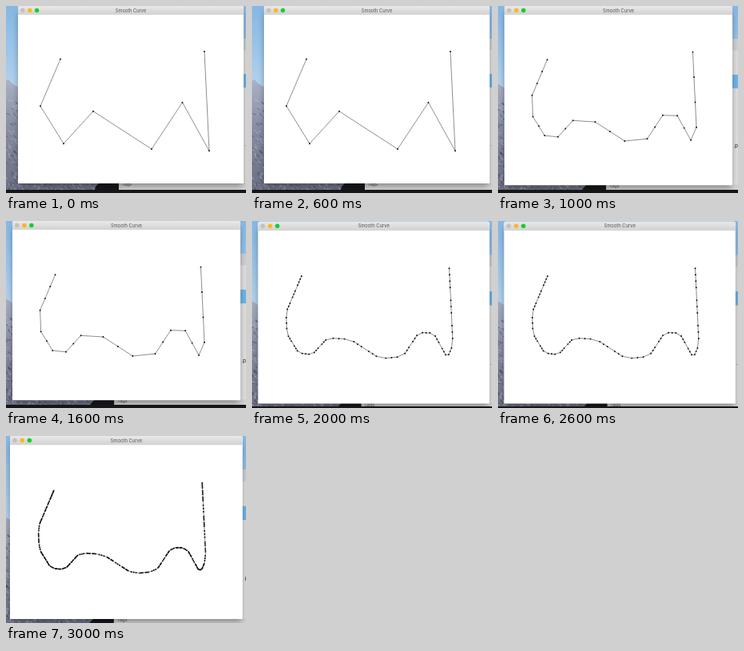
These frames come from a looping animation (300 px wide and 234 px high, 4 s). An HTML page:

```html
<!DOCTYPE html>
<html lang="en">
<head>
<meta charset="utf-8">
<title>Smooth Curve</title>
<style>
  html, body { margin: 0; width: 100%; height: 100%; overflow: hidden; background: #161616; }
  svg { display: block; width: 100%; height: 100%; }
  text { font-family: Inter, "Open Sans", sans-serif; }
</style>
</head>
<body>
<svg viewBox="0 0 300 234">
  <defs>
    <linearGradient id="sky" x1="0" y1="0" x2="0" y2="1">
      <stop offset="0" stop-color="#83b6e2"/>
      <stop offset=".5" stop-color="#9cc5ea"/>
      <stop offset="1" stop-color="#bcd6ee"/>
    </linearGradient>
    <linearGradient id="rock" x1="0" y1="0" x2="0" y2="1">
      <stop offset="0" stop-color="#a9b2c6"/>
      <stop offset=".4" stop-color="#878ca2"/>
      <stop offset="1" stop-color="#666a7e"/>
    </linearGradient>
    <linearGradient id="bar" x1="0" y1="0" x2="0" y2="1">
      <stop offset="0" stop-color="#e9e9e9"/>
      <stop offset="1" stop-color="#d2d2d2"/>
    </linearGradient>
    <filter id="blur" x="-10%" y="-10%" width="120%" height="120%">
      <feGaussianBlur stdDeviation="4"/>
    </filter>
  </defs>
  <g id="scene">
    <rect x="-5" y="-5" width="320" height="120" fill="url(#sky)"/>
    <path d="M-5 95L3 92L8 97L16 102V215H145V245H-5Z" fill="url(#rock)"/>
    <g id="specks"></g>
    <path d="M107 245L112 226L120 218H145V245Z" fill="#15171c"/>
    <rect x="141" y="41" width="170" height="200" fill="#dedede"/>
    <rect x="141" y="41" width="170" height="14" fill="#cfcfcf"/>
    <rect x="270" y="85" width="40" height="17" fill="#6fb4e6"/>
    <rect x="141" y="221" width="170" height="20" fill="#d2d2d2"/>
    <text x="298" y="175" font-size="6.5" fill="#222">.py</text>
    <text x="144.5" y="225" font-size="5.5" fill="#555">Tags</text>
    <rect x="16" y="9" width="280" height="216" fill="#000" opacity=".38" filter="url(#blur)"/>
    <path d="M15 222V2Q15 0 17 0H295Q297 0 297 2V222Z" fill="#fff"/>
    <path d="M15 10.5V2Q15 0 17 0H295Q297 0 297 2V10.5Z" fill="url(#bar)"/>
    <path d="M15 10.5H297" stroke="#c2c2c2" stroke-width=".5"/>
    <circle cx="20.8" cy="5.4" r="2.7" fill="#c8bfbd"/>
    <circle cx="29.8" cy="5.4" r="2.7" fill="#f9b91e"/>
    <circle cx="38.6" cy="5.4" r="2.7" fill="#14cf2c"/>
    <text x="156" y="7.5" font-size="5.7" fill="#555" text-anchor="middle">Smooth Curve</text>
    <path id="line" fill="none" stroke="#444" stroke-width=".6"/>
    <path id="dots" fill="none" stroke="#111" stroke-width="1.9" stroke-linecap="round"/>
  </g>
  <rect id="floor" width="300" height="10" fill="#161616"/>
</svg>
<script>
const $ = id => document.getElementById(id);
const STEP = 1000;
const corners = [[68, 66.5], [43, 125.2], [72, 172.2], [109, 131.7],
                 [182, 179], [220.5, 120.7], [254, 181.3], [248, 57]];

// Window position, zoom and picture height for each stage.
const views = [
  { left: 15, top: 0, zoom: 1, height: 230 },
  { left: 8, top: 0, zoom: 1.0106, height: 230 },
  { left: 7.5, top: .8, zoom: 1.026, height: 232 },
  { left: 5, top: 0, zoom: 1.031, height: 234 }
];

const mix = (a, b, t) => a.map((v, i) => v + (b[i] - v) * t);

// Corner cutting: keep the ends, replace each edge by its quarter points.
function smooth(points) {
  const inner = points.slice(1).flatMap((p, i) =>
    [.25, .5, .75].map(t => mix(points[i], p, t)));
  return [points[0], ...inner, points[points.length - 1]];
}

const stages = [corners];
while (stages.length < views.length) stages.push(smooth(stages[stages.length - 1]));

const paths = stages.map(points => {
  const at = points.map(p => p.map(v => v.toFixed(2)).join(" "));
  return { line: "M" + at.join("L"), dots: at.map(p => "M" + p + "h.01").join("") };
});

function addSpecks() {
  let seed = 7;
  const rand = () => (seed = seed * 16807 % 2147483647) / 2147483647;
  let marks = "";
  for (let i = 0; i < 180; i++) {
    const side = i < 80;
    const x = rand() * (side ? 15 : 110);
    const y = side ? 108 + rand() * 115 : 221 + rand() * 12;
    const color = rand() < .5 ? "#c6cad8" : "#3c4052";
    marks += `<path d="M${x} ${y}l${1 + rand() * 3} ${1 + rand() * 3}" stroke="${color}" opacity=".5"/>`;
  }
  $("specks").innerHTML = marks;
}

let shown = -1;
function draw(time) {
  const stage = Math.floor(time / STEP) % views.length;
  if (stage !== shown) {
    shown = stage;
    const { left, top, zoom, height } = views[stage];
    $("scene").setAttribute("transform", `translate(${left - 15 * zoom} ${top}) scale(${zoom})`);
    $("line").setAttribute("d", paths[stage].line);
    $("dots").setAttribute("d", paths[stage].dots);
    $("floor").setAttribute("y", height);
  }
}

function tick() {
  draw(performance.now());
  requestAnimationFrame(tick);
}

addSpecks();
tick();
</script>
</body>
</html>
```
